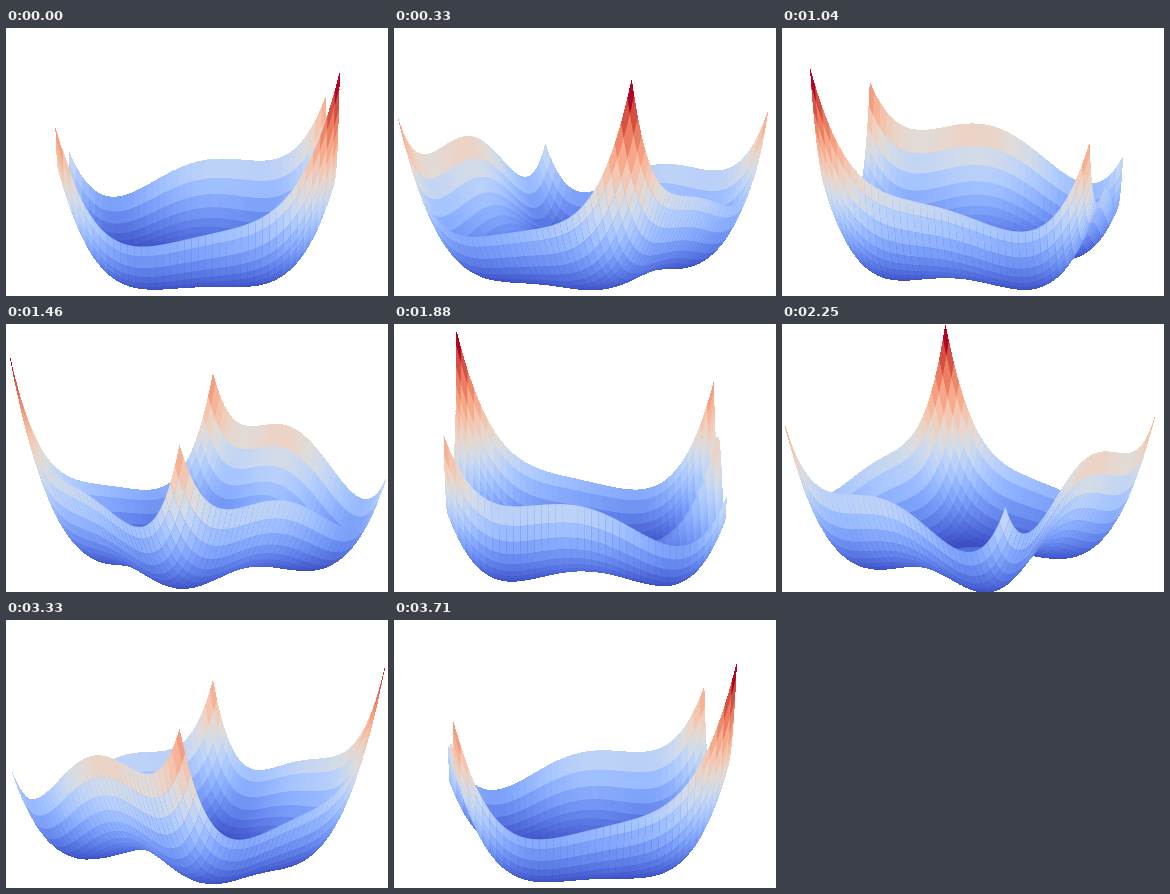
A matplotlib script for the animation above (3.75 s loop, 382 by 268 pixels).

```python
import numpy as np
import matplotlib.pyplot as plt
from matplotlib.animation import FuncAnimation
from matplotlib.collections import PolyCollection

W, H, DPI = 382, 268, 100
LOOP_MS, TICK_MS, STEPS = 3750, 10, 90

# Camera: elevation, perspective strength, pixels per unit, screen centre
ELEV = np.radians(9.6)
PERSP = 0.05
SCALE = 134.8
CX, CY = 191.4, 107.4

# Data box: half width and centre in x and y, height scale and centre in z
HALF, MID = 5.95, -0.05
Z_SCALE, Z_MID = 0.000819, 1250


def himmelblau(x, y):
    return (x**2 + y - 11) ** 2 + (x + y**2 - 7) ** 2


def cell_outlines():
    """Outline of every grid cell, with three steps along each side."""
    knots = np.append(np.arange(-6, 5.8, 0.3), 5.9)
    t = np.arange(3) / 3
    zero, one = np.zeros(3), np.ones(3)
    tx = np.concatenate([t, one, 1 - t, zero])
    ty = np.concatenate([zero, t, one, 1 - t])
    lo, size = knots[:-1], np.diff(knots)
    x0, y0 = (g.reshape(-1, 1) for g in np.meshgrid(lo, lo))
    dx, dy = (g.reshape(-1, 1) for g in np.meshgrid(size, size))
    return x0 + dx * tx, y0 + dy * ty


def project(azim):
    """Screen outlines of the cells and their nearness to the camera."""
    c, s = np.cos(azim), np.sin(azim)
    side = bx * -s + by * c
    near = bx * c + by * s
    depth = near * np.cos(ELEV) + bz * np.sin(ELEV)
    rise = bz * np.cos(ELEV) - near * np.sin(ELEV)
    zoom = SCALE / (1 - PERSP * depth)
    verts = np.stack([CX + side * zoom, CY - rise * zoom], axis=-1)
    return verts, depth.mean(axis=1)


def hard_edge(img, dpi):
    """Make each pixel of the surface either opaque or clear."""
    img[..., 3] = img[..., 3] > 0.5
    return img, 0, 0


xs, ys = cell_outlines()
zs = himmelblau(xs, ys)
bx, by = (xs - MID) / HALF, (ys - MID) / HALF
bz = (zs - Z_MID) * Z_SCALE

level = zs.mean(axis=1)
colors = plt.get_cmap("coolwarm")((level - level.min()) / np.ptp(level))

fig = plt.figure(figsize=(W / DPI, H / DPI), dpi=DPI, facecolor="white")
ax = fig.add_axes([0, 0, 1, 1])
ax.set_xlim(0, W)
ax.set_ylim(H, 0)
ax.axis("off")

surface = PolyCollection([], edgecolors="none", linewidths=0)
surface.set_agg_filter(hard_edge)
ax.add_collection(surface, autolim=False)


def draw(tick):
    # Each turn step starts on the 10 ms tick nearest to its exact time
    step = (6 * tick + 2) // 25
    verts, depth = project(2 * np.pi * step / STEPS)
    order = np.argsort(depth)
    surface.set_verts(verts[order])
    surface.set_facecolor(colors[order])
    return (surface,)


anim = FuncAnimation(fig, draw, frames=LOOP_MS // TICK_MS, interval=TICK_MS,
                     init_func=lambda: draw(0), repeat=True, repeat_delay=0)
plt.show()
```
